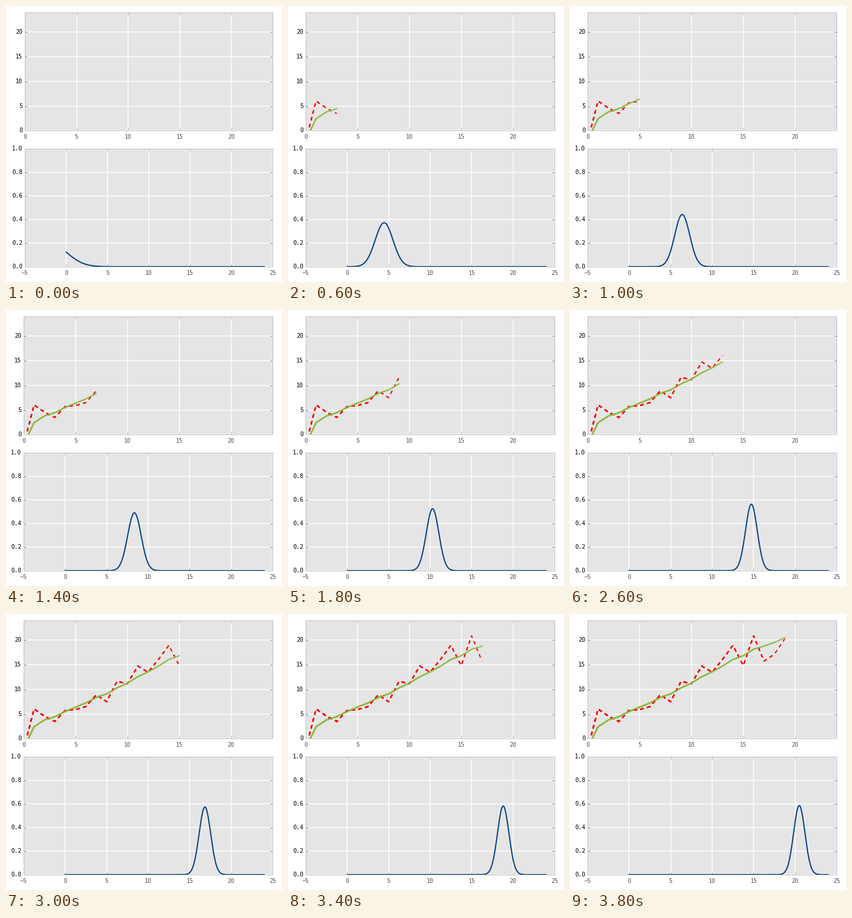
A matplotlib script that plays this animation: 468 by 468 pixels, repeating every 4000 ms.

```python
import numpy as np
import matplotlib.pyplot as plt
from matplotlib.animation import FuncAnimation

SIZE, DPI = 468, 72
STEP_MS = 200
RED, GREEN, BLUE = "#ff0000", "#8eba42", "#004080"

plt.rcParams.update({
    "font.family": "DejaVu Sans Mono",
    "font.size": 10,
    "figure.dpi": DPI,
    "axes.facecolor": "#e5e5e5",
    "axes.edgecolor": "#bcbcbc",
    "axes.linewidth": 1.0,
    "axes.axisbelow": True,
    "axes.grid": True,
    "grid.color": "white",
    "grid.linewidth": 1.5,
    "grid.linestyle": "-",
    "lines.linewidth": 2.0,
    "ytick.alignment": "center",
})

# Noisy position readings of an object moving one unit per step
READINGS = [-2.13, 6.03, 4.55, 3.47, 5.7, 5.9, 6.5, 8.9, 7.5, 11.65,
            11.15, 14.75, 13.5, 16.1, 18.95, 14.85, 20.9, 15.75, 17.15, 20.25]
SENSOR_VAR, MOVE_VAR, START_VAR = 4.5, 0.05, 50.0


def kalman(readings):
    """Return the filtered means and variances, one per reading."""
    mean, var = 0.0, START_VAR
    means, variances = [], []
    for k, z in enumerate(readings):
        if k:
            mean, var = mean + 1, var + MOVE_VAR
        gain = var / (var + SENSOR_VAR)
        mean += gain * (z - mean)
        var *= 1 - gain
        means.append(mean)
        variances.append(var)
    return means, variances


def gaussian(x, mean, var):
    return np.exp(-(x - mean) ** 2 / (2 * var)) / np.sqrt(2 * np.pi * var)


def place(ax, left, bottom, right=452, height=200.1):
    """Position an axes in pixels measured from the top left corner."""
    ax.set_position([left / SIZE, 1 - bottom / SIZE,
                     (right - left) / SIZE, height / SIZE])


def style(ax, xlim, ylim, xticks, yticks):
    ax.set(xlim=xlim, ylim=ylim, xticks=xticks, yticks=yticks)
    ax.tick_params(direction="in", length=4, width=0.5, top=True, right=True)
    ax.tick_params(axis="x", colors="#555555", pad=6, grid_color="white")
    ax.tick_params(axis="y", colors="black", pad=4, grid_color="white")


means, variances = kalman(READINGS)
steps = np.arange(len(READINGS))
xs = np.linspace(0, 24, 600)

fig = plt.figure(figsize=(SIZE / DPI, SIZE / DPI), dpi=DPI, facecolor="white")
track = fig.add_axes([0, 0.5, 1, 0.5])
belief = fig.add_axes([0, 0, 1, 0.5])

# Every step redraws the whole track over the earlier ones,
# so older segments look heavier than the newest one.
layers = []
for n in steps + 1:
    measured, = track.plot(steps[:n], READINGS[:n], color=RED,
                           linestyle=(0, (3, 3)))
    filtered, = track.plot(steps[:n], means[:n], color=GREEN)
    layers.append((measured, filtered))
curve, = belief.plot([], [], color=BLUE)

style(track, (0, 24), (0, 24), range(0, 21, 5), range(0, 21, 5))
style(belief, (-5, 25), (0, 1), range(-5, 26, 5), np.arange(6) / 5)


def update(k):
    left = 30 if k else 32
    place(track, left, 211.2)
    place(belief, left, 442)
    for j, pair in enumerate(layers):
        for line in pair:
            line.set_visible(0 < j <= k)
    curve.set_data(xs, gaussian(xs, means[k], variances[k]))
    return []


anim = FuncAnimation(fig, update, frames=len(READINGS), interval=STEP_MS,
                     init_func=lambda: update(0), repeat=True, repeat_delay=0,
                     blit=False)
plt.show()
```
